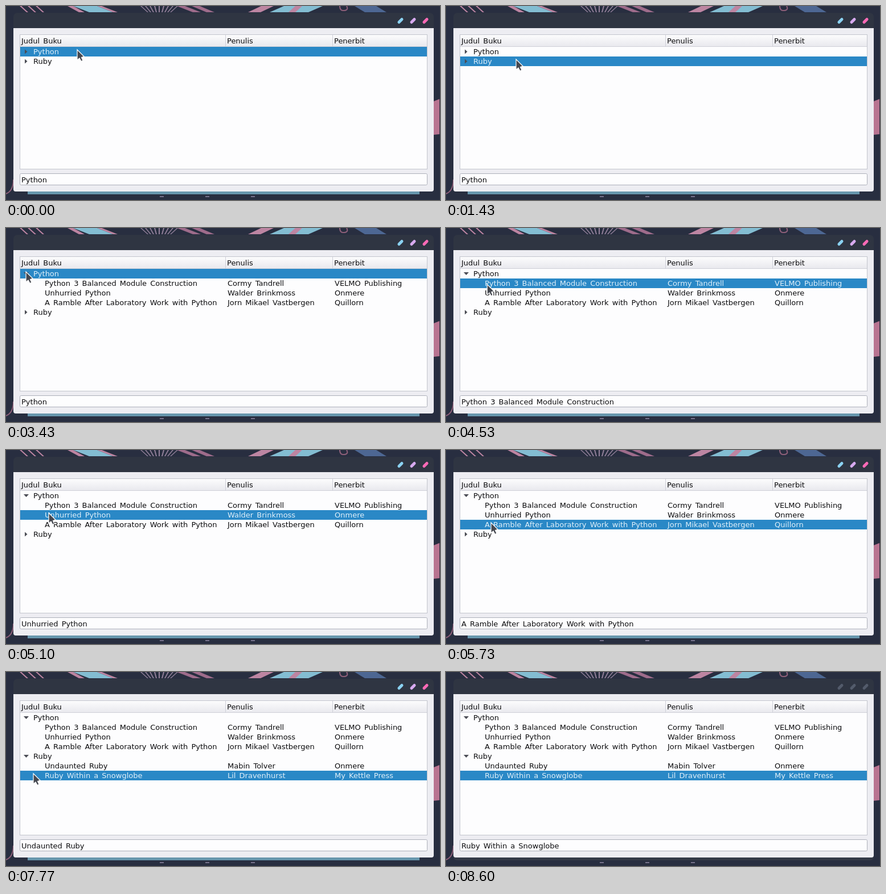
Write an HTML page that moves like this. It is 762 by 342 pixels and loops after 8.73 s.

```html
<!DOCTYPE html>
<html lang="id">
<head>
<meta charset="utf-8">
<title>Judul Buku</title>
<style>
  html, body { margin: 0; width: 100%; height: 100%; overflow: hidden; background: #282e40; }
  svg { display: block; width: 762px; height: 342px; }
  text { font: 13px "DejaVu Sans", sans-serif; word-spacing: 2px; fill: #0c0c0e; white-space: pre; }
  .selected text { fill: #e0f0fa; }
</style>
</head>
<body>
<svg viewBox="0 0 762 342">
  <defs>
    <linearGradient id="headerFill" x2="0" y2="1">
      <stop offset="0" stop-color="#fcfcfd"/>
      <stop offset="1" stop-color="#e9e9ee"/>
    </linearGradient>
  </defs>

  <rect width="762" height="342" fill="#282e40"/>
  <g id="wallpaper"></g>
  <path d="M0 331Q13 326 13 306M586 0Q586 9 594 8T598 0" fill="none" stroke="#8d5f78" stroke-width="2"/>
  <path d="M751 168L761 164V226L751 227Z" fill="#b87491"/>
  <rect x="38" y="327" width="688" height="5" fill="#6796ad"/>
  <path id="edge" d="M13 324H751Q751 332 744 332H20Q13 332 13 324Z" fill="#343a47"/>

  <path d="M13 39H751V323Q751 327 747 327H17Q13 327 13 323Z" fill="#ededf2"/>
  <path d="M13 39V20Q13 12 21 12H743Q751 12 751 20V39Z" fill="#2f3542"/>
  <g id="buttons" stroke-width="5" stroke-linecap="round"></g>
  <rect x="24.500" y="50.500" width="715" height="237" fill="#fdfdfe" stroke="#c3c5cd"/>
  <rect x="25" y="51" width="714" height="20" fill="url(#headerFill)"/>
  <path d="M25 71.500H739M385.500 51V71M573.500 51V71" stroke="#cfd0d8"/>
  <text x="27" y="66">Judul Buku</text>
  <text x="388" y="66">Penulis</text>
  <text x="576" y="66">Penerbit</text>
  <rect id="highlight" x="25" width="714" height="17" fill="#2a88c6"/>
  <g id="rows"></g>
  <rect x="24.500" y="295.500" width="715" height="20" rx="2" fill="#fdfdfe" stroke="#adb0ba"/>
  <text id="entry" x="27" y="311"></text>
  <path id="cursor" d="M0 0V18.500L4 15L7 20.500L10 19L7.500 13.500L12 12Z" fill="#454850" stroke="#fff" stroke-width="1.200"/>
</svg>

<script>
const LOOP = 8730, GLIDE = 300, ENTRY_LAG = 150;
const ROW_TOP = 72, ROW_HEIGHT = 17;
const $ = id => document.getElementById(id);

const books = [
  { title: "Python", branch: true },
  { title: "Python 3 Balanced Module Construction", author: "Cormy Tandrell", publisher: "VELMO Publishing" },
  { title: "Unhurried Python", author: "Walder Brinkmoss", publisher: "Onmere" },
  { title: "A Ramble After Laboratory Work with Python", author: "Jorn Mikael Vastbergen", publisher: "Quillorn" },
  { title: "Ruby", branch: true },
  { title: "Undaunted Ruby", author: "Mabin Tolver", publisher: "Onmere" },
  { title: "Ruby Within a Snowglobe", author: "Lil Dravenhurst", publisher: "My Kettle Press" }
];
const RUBY = books.findIndex(book => book.title === "Ruby");
const OFFSTAGE = 16;

// The cursor arrives at a row, then picks it or opens its branch.
const visits = [
  { arrive: 0, row: 0, x: 125, pick: 0 },
  { arrive: 1100, row: RUBY, x: 123, pick: 1300 },
  { arrive: 2150, row: 0, x: 104, pick: 2300 },
  { arrive: 2870, row: 0, x: 35, open: 3270 },
  { arrive: 4100, row: 1, x: 71, pick: 4170 },
  { arrive: 4720, row: 2, x: 75, pick: 4870 },
  { arrive: 5450, row: 3, x: 79, pick: 5500 },
  { arrive: 6230, row: RUBY, x: 35, open: 6770 },
  { arrive: 7130, row: 5, x: 42, pick: 7170 },
  { arrive: 7630, row: 6, x: 48, pick: 7670 },
  { arrive: 8350, row: OFFSTAGE, x: 62 }
];

const mix = (a, b, p) => a + (b - a) * p;
const ramp = (t, from, to) => Math.min(1, Math.max(0, (t - from) / (to - from)));
const smooth = p => p * p * (3 - 2 * p);

function add(parent, tag, attrs, text = "") {
  const node = document.createElementNS("http://www.w3.org/2000/svg", tag);
  for (const key in attrs) node.setAttribute(key, attrs[key]);
  node.textContent = text;
  return parent.appendChild(node);
}

function slant(x, width, lean, fill) {
  add($("wallpaper"), "path", { d: `M${x} 0h${width}l${lean} 11h${-width}Z`, fill });
}

function paintWallpaper() {
  const pink = "#bd85a2", blue = "#83bdd2", slate = "#4d6793";
  for (let i = 0; i < 3; i++) slant(24 + 14 * i, 3, 12, pink);
  slant(108, 10, 20, pink);
  slant(118, 42, 28, blue);
  slant(160, 8, 28, pink);
  for (let i = -4; i <= 4; i++) slant(268 + 8 * i, 2, 3 * -i, "#93819a");
  slant(300, 14, 28, "#9e6c8b");
  slant(326, 14, 26, "#9e6c8b");
  slant(448, 22, -23, pink);
  slant(488, 68, -25, blue);
  slant(508, 12, -12, pink);
  slant(612, 38, 18, slate);
  for (let i = 0; i < 3; i++) {
    add($("wallpaper"), "rect", { x: 270 + 80 * i, y: 335, width: 7, height: 2, fill: "#77728c" });
  }
}
paintWallpaper();

const rows = books.map(({ title, author, publisher, branch }) => {
  const group = add($("rows"), "g", {});
  const label = (x, text) => add(group, "text", { x, y: 13 }, text);
  label(branch ? 48 : 68, title);
  if (branch) return { group, arrow: add(group, "path", { fill: "#4b4d55" }) };
  label(389, author);
  label(577, publisher);
  return { group };
});

const buttons = ["#8ad2f2", "#d8aaf0", "#ff69b6"].map((stroke, i) => {
  const d = `M${690 + 22 * i} 28.500l5 -5`;
  add($("buttons"), "path", { d, stroke: "#535b6b" });
  return add($("buttons"), "path", { d, stroke });
});

const parentOf = row => row < RUBY ? 0 : RUBY;
const isOpen = (branch, t) => visits.some(v => v.row === branch && v.open <= t);
const isShown = (row, t) => books[row].branch || isOpen(parentOf(row), t);
const lastPick = t => visits.findLast(v => v.pick <= t)?.row ?? 0;

function rowTop(row, t) {
  let line = row;
  for (let i = 0; i < Math.min(row, books.length); i++) if (!isShown(i, t)) line--;
  return ROW_TOP + ROW_HEIGHT * line;
}

function drawTree(t) {
  const selected = lastPick(t);
  rows.forEach(({ group, arrow }, i) => {
    group.style.display = isShown(i, t) ? "" : "none";
    group.setAttribute("transform", `translate(0 ${rowTop(i, t)})`);
    group.classList.toggle("selected", i === selected);
    if (arrow) arrow.setAttribute("d", isOpen(i, t) ? "M31 6H40L35.500 11Z" : "M33 4.500L37.500 8.500L33 12.500Z");
  });
  $("highlight").setAttribute("y", rowTop(selected, t));
  $("entry").textContent = books[lastPick(t - ENTRY_LAG)].title;
}

function drawCursor(t) {
  const index = visits.findLastIndex(v => v.arrive - GLIDE <= t);
  const to = visits[index], from = visits[Math.max(0, index - 1)];
  const p = smooth(ramp(t, to.arrive - GLIDE, to.arrive));
  const x = mix(from.x, to.x, p);
  const y = mix(rowTop(from.row, t), rowTop(to.row, t), p) + 5;
  $("cursor").setAttribute("transform", `translate(${x.toFixed(1)} ${y.toFixed(1)})`);
}

const start = performance.now();
function draw() {
  const t = (performance.now() - start) % LOOP;
  drawTree(t);
  drawCursor(t);
  const inactive = ramp(t, 8100, 8500);
  buttons.forEach(button => button.setAttribute("opacity", 1 - inactive));
  $("edge").setAttribute("opacity", inactive);
  requestAnimationFrame(draw);
}
draw();
</script>
</body>
</html>
```
